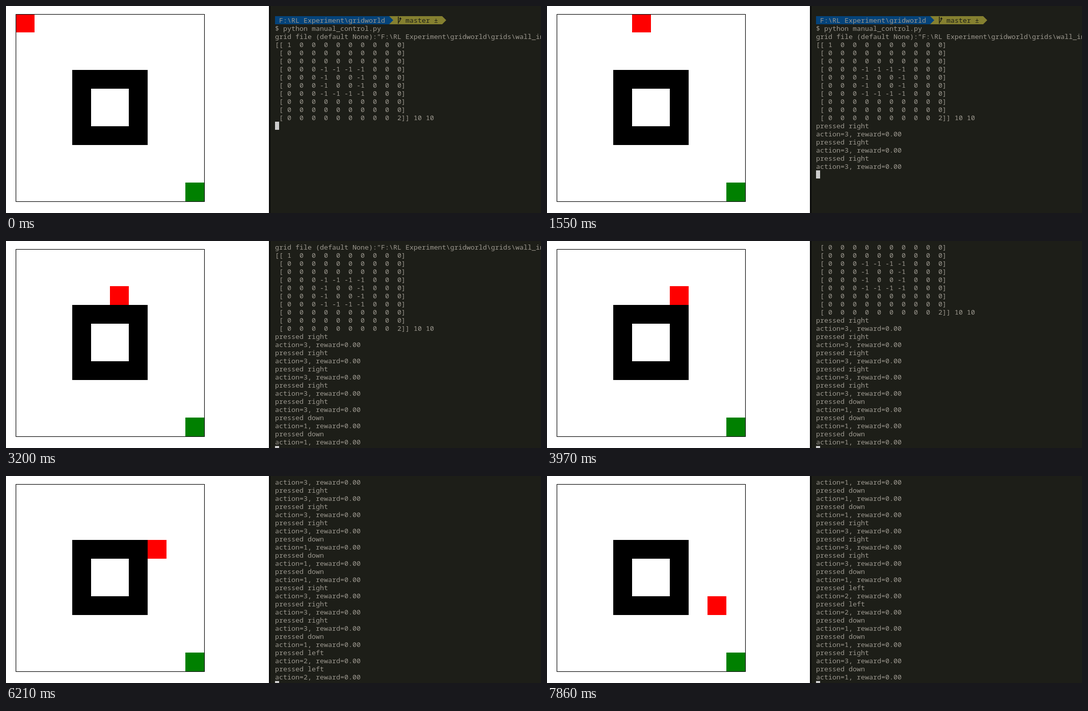
An HTML page with a canvas that plays this animation: 1050 px wide and 408 px high, repeating every 8000 ms.

```html
<!DOCTYPE html>
<html lang="en">
<head>
<meta charset="utf-8">
<title>Gridworld manual control</title>
<style>
  html, body { margin: 0; overflow: hidden; background: #fff; }
  canvas { display: block; }
</style>
</head>
<body>
<canvas width="1050" height="408"></canvas>
<script>
const ctx = document.querySelector('canvas').getContext('2d');
const LOOP = 8000, CELL = 37, CHAR = 8, LINE = 16, LEFT = 528, TOP = 4, LAST_LINE = 25;
const FIRST_FLUSH = 620, FLUSH_PERIOD = 516;
const TEXT = '#9b978e', DARK = '#1d1e18';

const keys = {
  R: { name: 'right', action: 3, dx: 1, dy: 0 },
  D: { name: 'down', action: 1, dx: 0, dy: 1 },
  L: { name: 'left', action: 2, dx: -1, dy: 0 }
};
// Keys with the time each is pressed
const script = 'R570 R850 R1100 R1550 R2020 D2880 D3100 D3680 R3970 ' +
  'R4380 R4920 D5360 L5930 L6210 D6690 D7070 R7320 D7760';

function gridValue(col, row) {
  if (row + col === 0) return 1;
  if (row + col === 18) return 2;
  const ring = Math.max(Math.abs(row - 4.5), Math.abs(col - 4.5));
  return ring === 1.5 ? -1 : 0;
}

// Play the script through the grid; walls block the agent
let col = 0, row = 0;
const presses = script.split(' ').map(entry => {
  const key = keys[entry[0]];
  const blocked = gridValue(col + key.dx, row + key.dy) === -1;
  if (!blocked) {
    col += key.dx;
    row += key.dy;
  }
  return { key, time: +entry.slice(1), col, row, blocked };
});

const lines = [
  '',
  ' F:\\RL Experiment\\gridworld ',
  '$ python manual_control.py',
  'grid file (default None):"F:\\RL Experiment\\gridworld\\grids\\wall_inside.txt"'
];
for (let r = 0; r < 10; r++) {
  const values = Array.from({ length: 10 }, (_, c) => String(gridValue(c, r)).padStart(2));
  lines.push((r ? ' [' : '[[') + values.join(' ') + (r < 9 ? ']' : ']] 10 10'));
}
const headerLength = lines.length;
for (const { key } of presses) {
  lines.push('pressed ' + key.name, `action=${key.action}, reward=0.00`);
}

// Output is flushed periodically, and at once when a wall is hit
function printedCount(t) {
  const tick = FIRST_FLUSH + Math.floor((t - FIRST_FLUSH) / FLUSH_PERIOD) * FLUSH_PERIOD;
  const hits = presses.filter(p => p.blocked && p.time <= t).map(p => p.time);
  const flushed = Math.max(tick, ...hits);
  return presses.filter(p => p.time <= flushed).length;
}

function rect(color, x, y, w, h) {
  ctx.fillStyle = color;
  ctx.fillRect(x, y, w, h);
}

function cells(color, col, row, size = 1) {
  const y = Math.max(17, 15 + row * CELL);
  rect(color, 19 + col * CELL, y, size * CELL, 15 + (row + size) * CELL - y);
}

function text(str, x, y, color = TEXT) {
  ctx.fillStyle = color;
  ctx.fillText(str, x, y + 13);
}

function segment(color, x, y, width) {
  ctx.fillStyle = color;
  ctx.fill(new Path2D(`M${x} ${y}h${width}l8 8l-8 8h${-width}z`));
}

function branchIcon(x, y) {
  ctx.strokeStyle = ctx.fillStyle = DARK;
  ctx.lineWidth = 1.6;
  ctx.stroke(new Path2D(`M${x + 2} ${y + 1}v14m0 -3q4 -2 4 -8`));
  ctx.fill(new Path2D(`M${x + 3.5} ${y + 6}l2.5 -4l2.5 4z`));
}

function drawPrompt(y) {
  segment('#858030', LEFT + 28 * CHAR, y, 13 * CHAR);
  segment('#04437a', LEFT, y, 28 * CHAR);
  branchIcon(LEFT + 30 * CHAR, y);
  text('master ±', LEFT + 32 * CHAR, y, DARK);
}

function drawGrid(t) {
  const agent = presses.findLast(p => p.time <= t) || { col: 0, row: 0 };
  rect('#fff', 0, 0, 516, 408);
  cells('#000', 3, 3, 4);
  cells('#fff', 4, 4, 2);
  cells('#008000', 9, 9);
  cells('#f00', agent.col, agent.row);
  ctx.strokeStyle = '#000';
  ctx.lineWidth = 1.1;
  ctx.strokeRect(19.5, 16.5, 370, 369);
}

function drawTerminal(t) {
  rect('#0b0b0b', 516, 0, 3, 408);
  rect(DARK, 519, 0, 531, 408);
  const cursor = headerLength + 2 * printedCount(t);
  const scroll = Math.max(0, cursor - LAST_LINE);
  const lineY = i => TOP + (i - scroll) * LINE;
  for (let i = scroll; i < cursor; i++) {
    if (i === 1) drawPrompt(lineY(i));
    text(lines[i], LEFT, lineY(i));
  }
  rect('#ccc', LEFT, lineY(cursor), CHAR, LINE);
}

function draw() {
  const t = performance.now() % LOOP;
  ctx.font = '13.333px "Noto Sans Mono", monospace';
  drawGrid(t);
  drawTerminal(t);
  requestAnimationFrame(draw);
}
draw();
</script>
</body>
</html>
```
